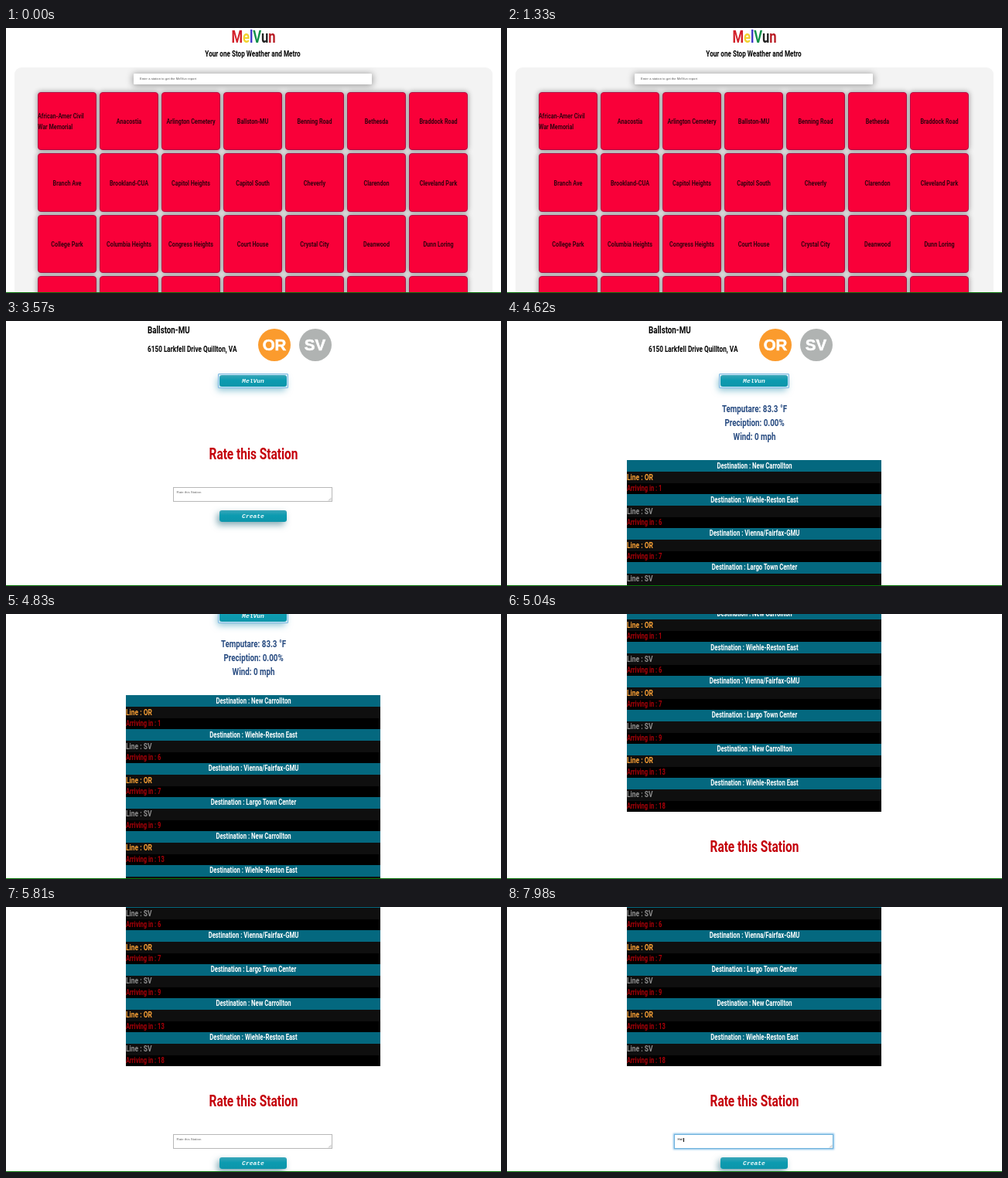
An HTML page for the animation above (8000 ms loop, 640 px wide and 343 px high).

```html
<!DOCTYPE html>
<html lang="en">
<head>
<meta charset="utf-8">
<title>Weather and Metro</title>
<style>
  html, body { margin: 0; width: 100%; height: 100%; overflow: hidden; background: #fff; }
  #stage { position: relative; width: 640px; height: 343px; overflow: hidden; background: #fff; }
  #stage div, #stage span { position: absolute; box-sizing: border-box; }
  .view { left: 0; top: 0; width: 640px; height: 640px; }
  .floor { left: 0; top: 342px; width: 640px; height: 1px; background: #077307; }

  /* t: condensed face, anchored at its left middle; c: centred */
  .t { white-space: pre; line-height: 1; font-family: Roboto, "Liberation Sans", sans-serif;
       font-weight: 600; transform-origin: 0 50%; transform: translateY(-50%) scaleX(.735); }
  .t.c { transform-origin: 50% 50%; transform: translate(-50%, -50%) scaleX(.735); }
  #stage .t span { position: static; }
  .small { white-space: pre; line-height: 1; font-family: "Liberation Sans", Arial, sans-serif;
           transform: translateY(-50%); }

  .panel { left: 11px; top: 51px; width: 618px; height: 400px; border-radius: 9px; background: #f3f3f3; }
  .search { left: 165px; top: 59px; width: 308px; height: 14px; border-radius: 1px; background: #fff;
            box-shadow: 0 1px 9px 1px rgba(0, 0, 0, .36); }
  .tile { width: 76px; height: 75.5px; border-radius: 4px; background: #f90039;
          border: 1px solid #b80a45; box-shadow: 0 0 6px 1px rgba(0, 0, 0, .32); }
  .badge { width: 42px; height: 42px; border-radius: 50%; top: 10px; color: #fff; text-align: center;
           font: bold 20.5px/41px "Liberation Sans", Arial, sans-serif; -webkit-text-stroke: .6px #fff; }
  .button { left: 276px; width: 87px; height: 15px; border-radius: 3px; color: #f2fcfd; text-align: center;
            font: italic bold 8px/16px "Liberation Mono", "Courier New", monospace;
            background: linear-gradient(#3aa6b9, #0c9bb0 45%, #0d95aa);
            box-shadow: -3px 4px 9px rgba(30, 100, 120, .55); }
  .button.focus { box-shadow: -2px 4px 9px 1px rgba(50, 150, 180, .55); }
  .button.focus::after { content: ""; position: absolute; inset: -2px; border: 1px solid #7db9e2; border-radius: 1px;
            box-shadow: inset 0 0 0 1px #d3eaf6; }
  .area { left: 216px; top: 215px; width: 206px; height: 18.5px; background: #fff; border: 1px solid #b8b8b8; }
  .area.focus { border-color: #6fb2dc; box-shadow: 0 0 2px 1px rgba(90, 170, 225, .75); }
  .area svg { position: absolute; right: 0; bottom: 0; }
  .caret { width: .6px; height: 5px; background: #000; }
  .row { left: 155px; width: 329px; }
</style>
</head>
<body>
<div id="stage">
  <div class="view" id="home"></div>
  <div class="view" id="station"></div>
  <div class="floor"></div>
</div>
<script>
const LOOP = 8000, STEP = 70;
const OPEN = 1610, PRESS = 3150, LOADED = 3640, FOCUS = 6790;
const BRAND = "MelVun";
const LINES = { OR: "#f9a035", SV: "#8f8f8f" };

const $ = id => document.getElementById(id);

function add(parent, cls, style = {}, text = "", tag = "div") {
  const el = document.createElement(tag);
  el.className = cls;
  Object.assign(el.style, style);
  el.textContent = text;
  parent.append(el);
  return el;
}

const px = n => n + "px";
const label = (parent, text, x, y, size, color, cls = "c") =>
  add(parent, "t " + cls, { left: px(x), top: px(y), fontSize: px(size), color }, text, "span");
const tiny = (parent, text, x, y, size, color) =>
  add(parent, "small", { left: px(x), top: px(y), fontSize: px(size), color }, text, "span");

function buildHome(page) {
  const title = label(page, "", 319.5, 11.5, 22.6, "#000");
  const hues = ["#d3202a", "#f2d22e", "#4038c8", "#12904a", "#222", "#b81c24"];
  [...BRAND].forEach((ch, i) => add(title, "", { color: hues[i] }, ch, "span"));
  label(page, "Your one Stop Weather and Metro", 319, 33.5, 11.1, "#000");

  add(page, "panel");
  add(page, "search");
  tiny(page, `Enter a station to get the ${BRAND} report`, 173, 66.3, 4.2, "#555");

  const names = ["African-Amer Civil\nWar Memorial", "Anacostia", "Arlington Cemetery", "Ballston-MU",
    "Benning Road", "Bethesda", "Braddock Road", "Branch Ave", "Brookland-CUA", "Capitol Heights",
    "Capitol South", "Cheverly", "Clarendon", "Cleveland Park", "College Park", "Columbia Heights",
    "Congress Heights", "Court House", "Crystal City", "Deanwood", "Dunn Loring"];
  for (let i = 0; i < 28; i++) {
    const x = 41.2 + i % 7 * 80, y = 82.8 + Math.floor(i / 7) * 79.5;
    add(page, "tile", { left: px(x), top: px(y) });
    if (!names[i]) continue;
    const parts = names[i].split("\n"), ink = "#35000f";
    if (parts.length > 1) parts.forEach((s, k) => label(page, s, x, y + 31.5 + k * 14, 9.8, ink, ""));
    else label(page, names[i], x + 38, y + 38.5, 9.8, ink);
  }
}

function buildStation(page) {
  label(page, "Ballston-MU", 183, 12, 13.3, "#000", "");
  label(page, "6150 Larkfell Drive Quillton, VA", 183, 36.5, 11.2, "#000", "");
  add(page, "badge", { left: "326px", background: "#fb9b2d" }, "OR");
  add(page, "badge", { left: "378.5px", background: "#b0b3b2" }, "SV");
  const button = add(page, "button", { top: "70px" }, BRAND);

  const report = add(page, "view");
  ["Temputare: 83.3 °F", "Preciption: 0.00%", "Wind: 0 mph"].forEach((s, i) =>
    label(report, s, 319.5, 113.5 + i * 18, 13.3, "#264a80"));
  const trains = [["New Carrollton", "OR", 1], ["Wiehle-Reston East", "SV", 6], ["Vienna/Fairfax-GMU", "OR", 7],
    ["Largo Town Center", "SV", 9], ["New Carrollton", "OR", 13], ["Wiehle-Reston East", "SV", 18]];
  const band = (y, h, background) => add(report, "row", { top: px(y), height: px(h), background });
  trains.forEach(([place, line, wait], i) => {
    const y = 180 + i * 43.9;
    band(y, 15, "#04687f");
    band(y + 15, 15, "#0f0f0f");
    band(y + 30, 14, "#000");
    label(report, "Destination : " + place, 319.5, y + 7.6, 10.5, "#fff");
    label(report, "Line : " + line, 155, y + 22.7, 11.5, LINES[line], "");
    label(report, "Arriving in : " + wait, 155, y + 37.4, 10.3, "#a80008", "");
  });

  const form = add(page, "view");
  label(form, "Rate this Station", 319.5, 172, 21, "#c4000a");
  const area = add(form, "area");
  area.innerHTML = '<svg width="5" height="5"><path d="M1 4.5L4.5 1M3 4.5L4.5 3" stroke="#888" stroke-width=".6"/></svg>';
  const hint = tiny(form, "Rate this Station", 220.5, 222.3, 4.35, "#666");
  const typed = tiny(form, "", 220.5, 222.3, 4.35, "#000");
  const caret = add(form, "caret", { top: "219.5px" });
  add(form, "button", { top: "245px" }, "Create");
  return { button, report, form, area, hint, typed, caret };
}

// [time, value] points joined by straight lines
const SCROLL = [[4620, 0], [4690, 8], [4830, 75], [5040, 188], [5180, 222], [5390, 238]];
const KEYS = [[7560, "H"], [7700, "He"], [7910, "Hel"]];

function along(points, t) {
  if (t <= points[0][0]) return points[0][1];
  for (let i = 1; i < points.length; i++) {
    const [t0, a] = points[i - 1], [t1, b] = points[i];
    if (t < t1) return a + (b - a) * (t - t0) / (t1 - t0);
  }
  return points[points.length - 1][1];
}

const home = $("home"), station = $("station");
buildHome(home);
const ui = buildStation(station);
const show = (el, on) => { el.style.display = on ? "block" : "none"; };

function draw(now) {
  const t = Math.floor(now % LOOP / STEP) * STEP;
  show(home, t < OPEN);
  show(station, t >= OPEN);
  station.style.transform = `translateY(${-Math.round(along(SCROLL, t))}px)`;

  const loaded = t >= LOADED, focus = t >= FOCUS;
  ui.button.classList.toggle("focus", t >= PRESS && !focus);
  show(ui.report, loaded);
  ui.form.style.top = loaded ? "317px" : "0";

  const text = KEYS.reduce((s, [at, v]) => t >= at ? v : s, "");
  ui.area.classList.toggle("focus", focus);
  ui.typed.textContent = text;
  show(ui.hint, !text);
  show(ui.caret, focus);
  ui.caret.style.left = px(220.7 + ui.typed.offsetWidth);
}

const start = performance.now();
function tick() {
  draw(performance.now() - start);
  requestAnimationFrame(tick);
}
tick();
</script>
</body>
</html>
```
